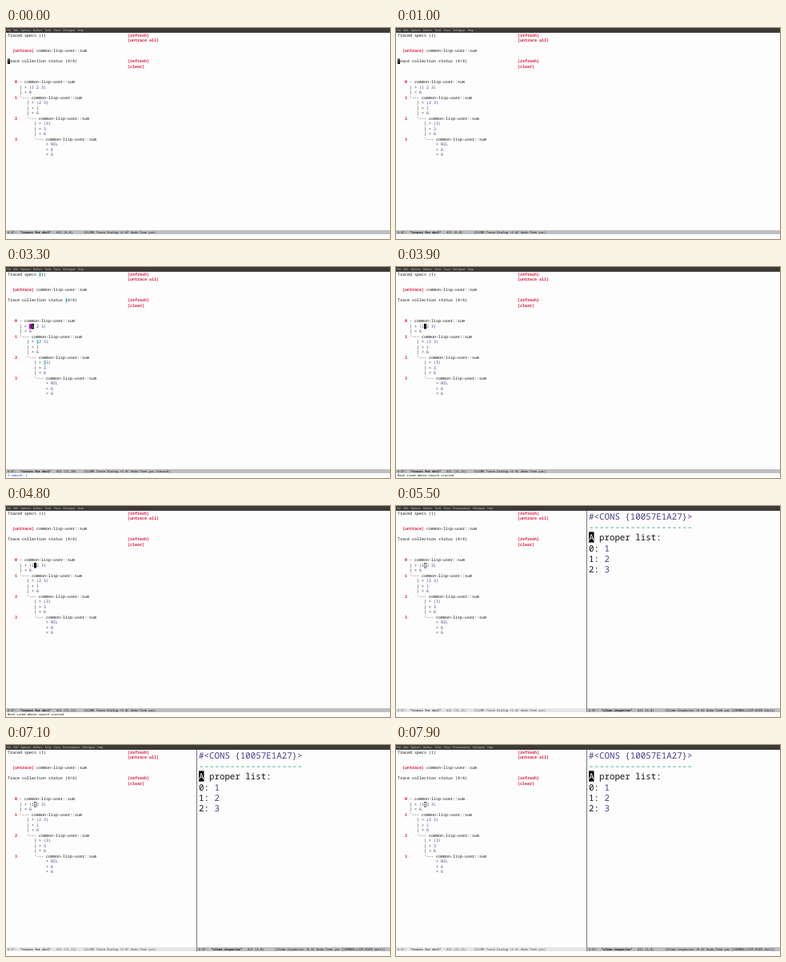
Recreate the animation shown at these times as an HTML page. Size 480 px wide and 264 px high, loop 8 s.

```html
<!DOCTYPE html>
<html lang="en">
<head>
<meta charset="utf-8">
<title>Trace dialog</title>
<style>
html, body { margin: 0; width: 100%; height: 100%; overflow: hidden; background: #fdfdfd; }
svg { display: block; width: 480px; height: 264px; }
text { font-family: "Noto Sans Mono", "DejaVu Sans Mono", monospace; white-space: pre; text-rendering: geometricPrecision; fill: #111; }
.code { font-size: 5px; }
.bar { font-size: 3.77px; }
.big { font-size: 10.8px; }
.menu { font: 3.3px "Open Sans", "Noto Sans", sans-serif; word-spacing: 2.4px; fill: #dfdbd2; }
.red { fill: #dc143c; font-weight: bold; }
.val { fill: #483d8b; }
.teal { fill: #2a9d8f; }
.bold { font-weight: bold; }
.inv { fill: #fff; }
.dim { fill: #444; }
.prompt { fill: #1c1cc4; }
.match { fill: #cd00cd; }
.lazy { fill: #afeeee; }

/* Scenes: idle, prompt, first hit, second hit, moved, inspector */
.scene { visibility: hidden; animation: 8s step-end infinite; }
.idle { animation-name: idle; }
.ask { animation-name: ask; }
.hit1 { animation-name: hit1; }
.hit2 { animation-name: hit2; }
.moved { animation-name: moved; }
.inspect { animation-name: inspect; }
@keyframes idle { 0% { visibility: visible } 23.75%, 100% { visibility: hidden } }
@keyframes ask { 0% { visibility: hidden } 23.75% { visibility: visible } 31.25%, 100% { visibility: hidden } }
@keyframes hit1 { 0% { visibility: hidden } 31.25% { visibility: visible } 36.25%, 100% { visibility: hidden } }
@keyframes hit2 { 0% { visibility: hidden } 36.25% { visibility: visible } 46.25%, 100% { visibility: hidden } }
@keyframes moved { 0% { visibility: hidden } 46.25% { visibility: visible } 63.75%, 100% { visibility: hidden } }
@keyframes inspect { 0% { visibility: hidden } 63.75%, 100% { visibility: visible } }
</style>
</head>
<body>
<svg viewBox="0 0 480 264"></svg>
<script>
const svg = document.querySelector('svg');
const LEFT = 2, TOP = 6, CW = 3, LH = 6.5;

function add(parent, tag, attrs, content) {
  const el = document.createElementNS('http://www.w3.org/2000/svg', tag);
  for (const key in attrs) el.setAttribute(key, attrs[key]);
  if (content) el.textContent = content;
  parent.append(el);
  return el;
}
const group = name => add(svg, 'g', { class: 'scene ' + name });
const rect = (g, x, y, width, height, attrs) => add(g, 'rect', { x, y, width, height, ...attrs });
const text = (g, x, y, cls, s) => add(g, 'text', { x, y, class: cls }, s);

// Cells of the trace buffer, counted from zero
const cellX = col => LEFT + col * CW;
const cellY = row => TOP + row * LH;
const put = (g, row, col, s, cls = '') => text(g, cellX(col), cellY(row) + 4.9, 'code ' + cls, s);
const cell = (g, row, col, attrs) => rect(g, cellX(col), cellY(row), CW, LH, attrs);

function cursor(g, row, col, ch) {
  cell(g, row, col, { fill: '#000' });
  put(g, row, col, ch, 'inv');
}

function modeLine(g, x, width, active, name, pos, modes) {
  rect(g, x, 253, width, 5, { fill: active ? '#bfbfbf' : '#e5e5e5' });
  const cls = active ? 'bar ' : 'bar dim ';
  const write = (col, s, extra = '') => text(g, x + 2 + col * 2.262, 256.85, cls + extra, s);
  write(0, 'U:%*-');
  write(7, name, 'bold');
  write(27, `All (${pos})`);
  write(42, `(${modes})`);
}
const traceLine = (g, pos, extra = '', width = 480, active = true) =>
  modeLine(g, 0, width, active, '*traces for sbcl*', pos, 'SLIME Trace Dialog +2 AC Undo-Tree yas' + extra);
const echo = (g, s, col = 0, cls = '') => text(g, LEFT + col * 2.262, 261.9, 'bar ' + cls, s);
const menu = (g, extra = '') => {
  rect(g, 0, 0, 480, TOP, { fill: '#3c3b37' });
  text(g, 1, 3.9, 'menu', `File Edit Options Buffers Tools Trace ${extra}YASnippet Help`);
};

rect(svg, 0, 0, 480, 264, { fill: '#fdfdfd' });

// Search highlights lie under the text
const parens = [[0, 13], [5, 24], [10, 9], [13, 12], [17, 15]];
['hit1', 'hit2'].forEach((name, i) => {
  const g = group(name);
  parens.forEach(([row, col], k) => cell(g, row, col, { class: k === i + 1 ? 'match' : 'lazy' }));
});

// Trace buffer
menu(svg);
put(svg, 0, 0, 'Traced specs (1)');
put(svg, 0, 50, '[refresh]', 'red');
put(svg, 1, 50, '[untrace all]', 'red');
put(svg, 3, 2, '[untrace]', 'red');
put(svg, 3, 12, 'common-lisp-user::sum');
put(svg, 5, 0, 'Trace collection status (4/4)');
put(svg, 5, 50, '[refresh]', 'red');
put(svg, 6, 50, '[clear]', 'red');

const calls = [['(1 2 3)'], ['(2 3)', '1'], ['(3)', '3'], ['NIL', '6']];
let row = 9;
calls.forEach((args, depth) => {
  const col = 5 + 3 * depth;
  put(svg, row, 3, String(depth), 'red');
  if (depth) put(svg, row, col - 3, "'---");
  else put(svg, row, col, '-');
  put(svg, row++, col + 2, 'common-lisp-user::sum');
  const lines = [...args.map(a => ['>', a]), ['<', '6']];
  for (const [mark, value] of lines) {
    if (depth < 3) put(svg, row, col, '|');
    put(svg, row, col + 2, mark);
    put(svg, row++, col + 4, value, 'val');
  }
});

const idle = group('idle');
cursor(idle, 5, 0, 'T');
traceLine(idle, '6,0');

const ask = group('ask');
cursor(ask, 5, 0, 'T');
traceLine(ask, '6,0', ' Isearch');
echo(ask, 'I-search:', 0, 'prompt');

const hit1 = group('hit1');
cursor(hit1, 5, 25, '4');
traceLine(hit1, '6,25', ' Isearch');

const hit2 = group('hit2');
cursor(hit2, 10, 10, '1');
traceLine(hit2, '11,10', ' Isearch');

for (const g of [hit1, hit2]) {
  echo(g, 'I-search:', 0, 'prompt');
  echo(g, '(', 10);
}

const moved = group('moved');
cursor(moved, 10, 11, ' ');
traceLine(moved, '11,11');
echo(moved, 'Mark saved where search started');

// Inspector window
const inspect = group('inspect');
const IX = 241, IW = 6.48, IH = 13.2;
const show = (r, col, s, cls = '') => text(inspect, IX + col * IW, 16.9 + r * IH, 'big ' + cls, s);
menu(inspect, 'Presentations ');
rect(inspect, cellX(11) + .25, cellY(10) + .25, CW - .5, LH - .5, { fill: 'none', stroke: '#000', 'stroke-width': .5 });
traceLine(inspect, '11,11', '', 239, false);
modeLine(inspect, 239, 241, true, '*slime-inspector*', '3,0',
  'Slime-Inspector +8 AC Undo-Tree yas [COMMON-LISP-USER sbcl]');
rect(inspect, 238, TOP, 1, 252, { fill: '#777' });
show(0, 0, '#<CONS {10057E1A27}>', 'val');
show(1, 0, '-'.repeat(20), 'teal');
rect(inspect, IX, TOP + 2 * IH, IW, IH, { fill: '#000' });
show(2, 0, 'A', 'inv');
show(2, 2, 'proper list:');
for (let i = 0; i < 3; i++) {
  show(3 + i, 0, i + ':');
  show(3 + i, 3, String(i + 1), 'val');
}
</script>
</body>
</html>
```
